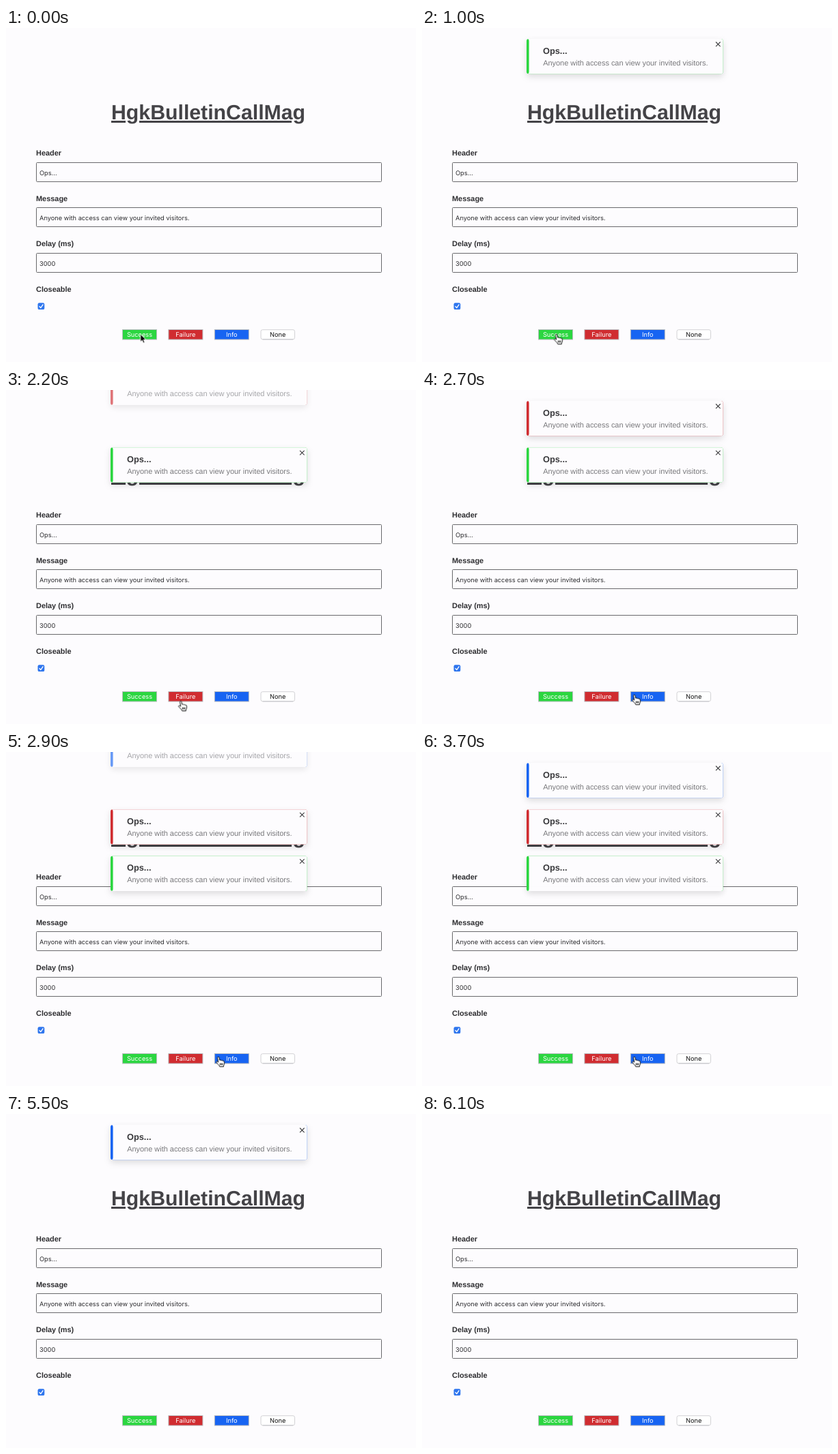
An HTML page for the animation above (6.2 s loop, 600x490 px).

```html
<!DOCTYPE html>
<html lang="en">
<head>
<meta charset="utf-8">
<title>Notification demo</title>
<style>
  html, body { margin: 0; width: 100%; height: 100%; overflow: hidden; background: #fdfcfe; }
  h1 {
    position: absolute; left: 154px; top: 107.5px; margin: 0;
    font: bold 30.25px/34px "Liberation Sans", Arial, sans-serif;
    color: #444347; white-space: nowrap; text-rendering: geometricPrecision;
    text-decoration: underline; text-decoration-thickness: 2.9px; text-underline-offset: 1.5px;
  }
  svg { position: absolute; left: 0; top: 0; text-rendering: geometricPrecision; }
  .label { font: bold 10.93px "Liberation Sans", Arial, sans-serif; fill: #2d2d30; }
  .value { font: 9.26px Inter, sans-serif; fill: #2b2b2e; }
  .field { fill: #fdfcfe; stroke: #69696c; }
  .button { font: 9.26px Inter, sans-serif; text-anchor: middle; fill: #fff; }
  .button rect { stroke: #b9bcc0; }

  /* Every animation shares the 6.2 s loop. */
  .card, .stack, #cursor, #cursor path { animation: 6.2s infinite; }

  .card { filter: drop-shadow(0 4px 5px rgba(0, 0, 0, .13)); animation-name: life; }
  .green { fill: #2bd640; animation-delay: calc(660ms - 6200ms); }
  .red { fill: #d02c30; animation-delay: calc(2060ms - 6200ms); }
  .blue { fill: #1764f2; animation-delay: calc(2760ms - 6200ms); }
  .card-title { font: bold 12.79px "Liberation Sans", Arial, sans-serif; fill: #39393c; }
  .card-text { font: 10.95px "Liberation Sans", Arial, sans-serif; fill: #77777a; }
  @keyframes life {
    0% { transform: translateY(-130px); opacity: 0; animation-timing-function: ease-out; }
    4.84% { transform: none; opacity: 1; }
    49.03% { transform: none; opacity: 1; animation-timing-function: ease-in; }
    53.55%, 100% { transform: translateY(-130px); opacity: 0; }
  }

  .stack { animation-timing-function: step-end; }
  #first { animation-name: push-twice; }
  #second { animation-name: push-once; }
  @keyframes push-twice {
    0% { transform: none; }
    33.23% { transform: translateY(68.3px); }
    44.52%, 100% { transform: translateY(136.6px); }
  }
  @keyframes push-once {
    0% { transform: none; }
    44.52%, 100% { transform: translateY(68.3px); }
  }

  #cursor { animation-name: travel; animation-timing-function: ease-in-out; }
  #cursor path { animation-timing-function: step-end; stroke-linejoin: round; }
  #cursor .arrow { animation-name: arrow; fill: #000; stroke: #fff; stroke-width: .9; }
  #cursor .hand { animation-name: hand; fill: #fff; stroke: #111; stroke-width: 1; }
  @keyframes travel {
    0%, 23.4% { transform: translate(196.7px, 449.3px); visibility: visible; }
    31.6%, 35.5% { transform: translate(255.7px, 456.3px); }
    42.9%, 61.28% { transform: translate(310.8px, 447.2px); visibility: visible; }
    61.29%, 100% { transform: translate(310.8px, 447.2px); visibility: hidden; }
  }
  @keyframes arrow {
    0%, 26.5%, 39.6% { opacity: 1; }
    11.1%, 28.4%, 41.1%, 100% { opacity: 0; }
  }
  @keyframes hand {
    0%, 26.5%, 39.6% { opacity: 0; }
    11.1%, 28.4%, 41.1%, 100% { opacity: 1; }
  }
</style>
</head>
<body>
<h1>HgkBulletinCallMag</h1>
<svg width="600" height="490" viewBox="0 0 600 490">
  <defs>
    <g id="notice">
      <rect x="153" y="16" width="287.5" height="51.3" rx="3"/>
      <path d="M155 16Q156.6 16.4 156.6 19V64.3Q156.6 67 155 67.3H437.5Q440.5 67.3 440.5 64.3V19Q440.5 16 437.5 16Z" fill="#fdfcfe"/>
      <text class="card-title" x="177" y="37.8">Ops...</text>
      <text class="card-text" x="177.2" y="54.7">Anyone with access can view your invited visitors.</text>
      <path d="M430 20.5L436.6 27.1M436.6 20.5L430 27.1" fill="none" stroke="#3c3c3e" stroke-width="1.1"/>
    </g>
  </defs>

  <g id="form"></g>
  <text class="label" x="44" y="386.5">Closeable</text>
  <rect x="46.5" y="403.3" width="9.8" height="9.8" rx="2.2" fill="#2f76ee"/>
  <path d="M49 408.5L50.8 410.6L54 405.8" fill="none" stroke="#fff" stroke-width="1.3" stroke-linecap="round" stroke-linejoin="round"/>
  <g id="buttons"></g>

  <g class="card blue"><use href="#notice"/></g>
  <g class="stack" id="second"><g class="card red"><use href="#notice"/></g></g>
  <g class="stack" id="first"><g class="card green"><use href="#notice"/></g></g>

  <g id="cursor">
    <path class="arrow" d="M0 0V11.2L2.5 8.8L4.3 12.8L6.2 12L4.5 8H8Z"/>
    <path class="hand" d="M-1.3 1.3Q-1.2 0 0 0Q1 0 1.2 1.3L1.9 5Q3.5 4.2 4.4 5.4Q6 4.7 6.7 6Q8.4 5.6 8.7 7.2V10Q8.3 12 7.5 13V14.5H2Q1.5 13 0 11.5L-2.8 8.6Q-3.7 7.3-2.6 6.8Q-1.6 6.5-.1 8ZM2.6 9.3V12.3M4.3 9.3V12.3M6 9.3V12.3"/>
  </g>
</svg>
<script>
  const fields = [
    ["Header", "Ops..."],
    ["Message", "Anyone with access can view your invited visitors."],
    ["Delay (ms)", "3000"]
  ];
  document.getElementById("form").innerHTML = fields.map(([label, value], i) => {
    const y = i * 66.5;
    return `<text class="label" x="44" y="${187 + y}">${label}</text>
      <rect class="field" x="44.5" y="${Math.floor(197 + y) + .5}" width="505" height="28" rx="1"/>
      <text class="value" x="49" y="${215.6 + y}">${value}</text>`;
  }).join("");

  const buttons = [["Success", "#2bd640"], ["Failure", "#d02c30"], ["Info", "#1764f2"]];
  document.getElementById("buttons").innerHTML = buttons.map(([name, color], i) => {
    const x = 170.5 + i * 67.4;
    return `<g class="button"><rect x="${x}" y="442.5" width="50" height="14.5" fill="${color}"/>
      <text x="${x + 25}" y="453.1">${name}</text></g>`;
  }).join("") +
    `<g class="button"><rect x="373" y="442.7" width="49.5" height="14" rx="2.5" fill="#fff" style="stroke:#d2d2d5"/>
      <path d="M375.5 456.9H420" stroke="#bcbcc0" stroke-width=".8"/>
      <text x="397.7" y="453.1" fill="#111">None</text></g>`;
</script>
</body>
</html>
```
